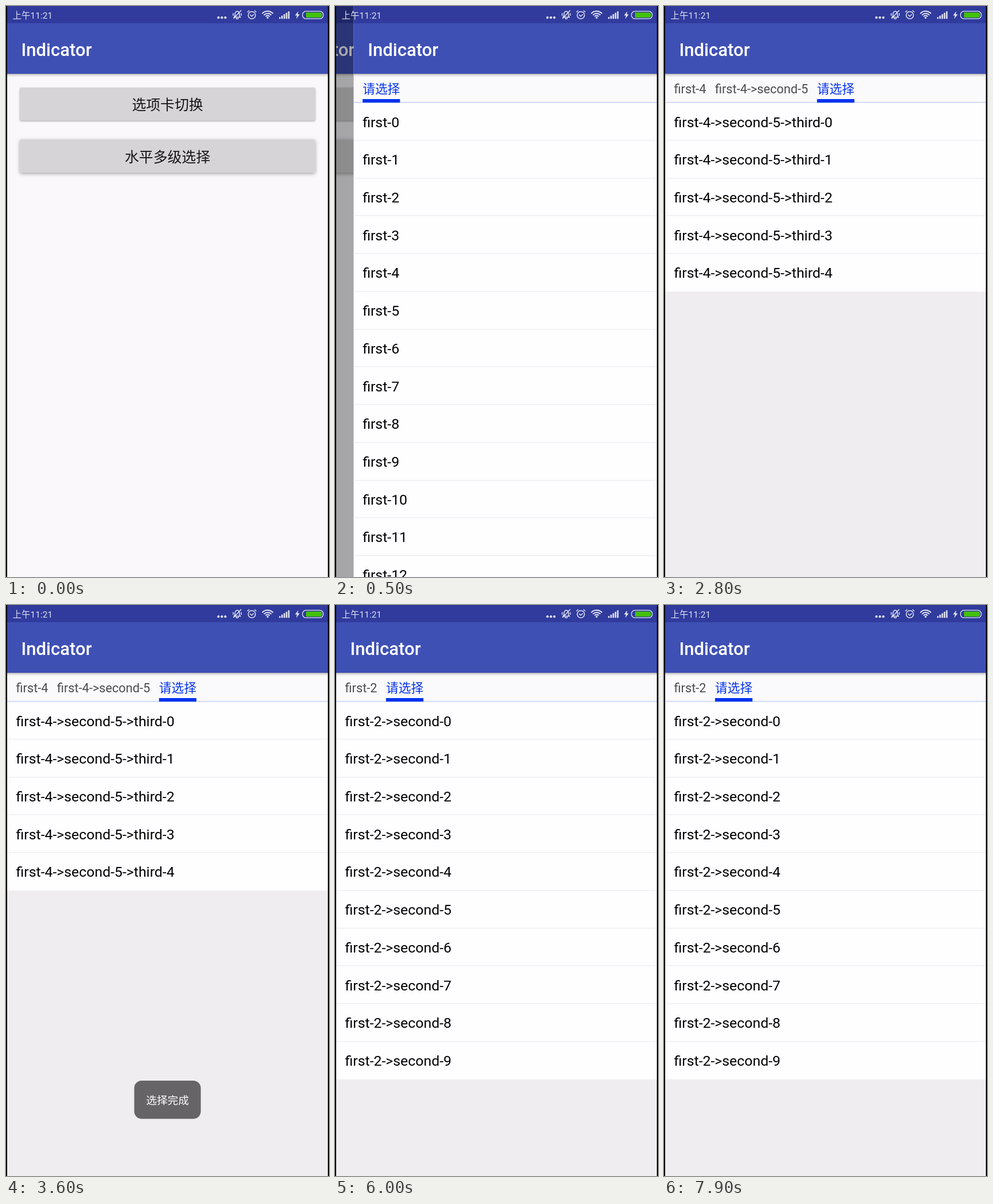
Animation of 563 by 994 pixels, one loop 8 s. Source, as an HTML page with a canvas:

```html
<!DOCTYPE html>
<html lang="zh-CN">
<head>
<meta charset="utf-8">
<title>Indicator</title>
<style>
html, body { margin: 0; width: 100%; height: 100%; overflow: hidden; background: #000; }
canvas { display: block; width: 563px; height: 994px; }
</style>
</head>
<body>
<canvas id="stage" width="563" height="994"></canvas>
<script>
const ctx = document.getElementById('stage').getContext('2d');
const LOOP = 8000, W = 563, H = 994;
const LEFT = 2, RIGHT = 561, WIDTH = RIGHT - LEFT;
const DP = WIDTH / 360;
const FONT = 'Roboto, "Noto Sans CJK SC", "Noto Sans CJK", sans-serif';
const BLUE = '#0433ee', ICON = '#e2e4f4';
const LIST_TOP = 168.3, ROW = 65.72;
const LEVELS = ['first', 'second', 'third'], COUNTS = [20, 10, 5];
const SLIDE_AT = 200, SLIDE_TIME = 393, MOVE_TIME = 350;
const TOAST_IN = 2900, TOAST_OUT = 5000;

// Selected index per level, from the given time on
const STEPS = [
  { at: 0, path: [] },
  { at: 1400, path: [4] },
  { at: 2100, path: [4, 5] },
  { at: 4000, path: [4] },
  { at: 4950, path: [] },
  { at: 5600, path: [2] },
  { at: 6400, path: [2, 3] },
  { at: 7500, path: [2] }
];

const clamp = v => Math.max(0, Math.min(1, v));
const mix = (a, b, k) => a + (b - a) * k;
const smooth = k => (1 - Math.cos(Math.PI * k)) / 2;
const font = (sp, weight = 400) => `${weight} ${sp * DP}px ${FONT}`;

function rect(x, y, w, h, fill) {
  ctx.fillStyle = fill;
  ctx.fillRect(x, y, w, h);
}

function pill(x, y, w, h, r) {
  ctx.beginPath();
  ctx.roundRect(x, y, w, h, r);
}

function text(str, x, y, sp, color, weight, align = 'left') {
  ctx.font = font(sp, weight);
  ctx.fillStyle = color;
  ctx.textAlign = align;
  ctx.fillText(str, x, y);
}

function line(points) {
  ctx.beginPath();
  points.forEach(([x, y], i) => i ? ctx.lineTo(x, y) : ctx.moveTo(x, y));
}

function arc(x, y, r, a = 0, b = 7) {
  ctx.beginPath();
  ctx.arc(x, y, r, a, b);
}

function appBar() {
  const shade = ctx.createLinearGradient(0, 118, 0, 124);
  shade.addColorStop(0, 'rgba(0,0,0,.3)');
  shade.addColorStop(0.4, 'rgba(0,0,0,.1)');
  shade.addColorStop(1, 'rgba(0,0,0,0)');
  rect(LEFT, 118, WIDTH, 6, shade);
  rect(LEFT, 0, WIDTH, 31, '#303b9d');
  rect(LEFT, 30, WIDTH, 88, '#3f50b5');
  text('Indicator', 26.5, 87, 20, '#fff', 500);
}

function button(label, y, h, blur, drop) {
  ctx.save();
  ctx.shadowColor = 'rgba(0,0,0,.34)';
  ctx.shadowBlur = blur;
  ctx.shadowOffsetY = drop;
  ctx.fillStyle = '#d6d4d6';
  pill(24, y, 515, h, 3);
  ctx.fill();
  ctx.restore();
  text(label, 281.5, y + 39, 16, '#161616', 400, 'center');
}

function menuScreen() {
  rect(LEFT, 0, WIDTH, H, '#faf8fb');
  appBar();
  button('选项卡切换', 142, 57.5, 3, 1);
  button('水平多级选择', 232.5, 57.5, 6, 2);
}

function prefix(path, n) {
  return path.slice(0, n).map((v, i) => `${LEVELS[i]}-${v}`).join('->');
}

function tabsOf(path) {
  const labels = path.map((_, i) => prefix(path, i + 1)).concat('请选择');
  let x = LEFT + 10 * DP;
  ctx.font = font(14);
  return labels.map(label => {
    const tab = { label, x, w: ctx.measureText(label).width };
    x += tab.w + 10 * DP;
    return tab;
  });
}

function marker(index, tabs, t) {
  const end = tabs[tabs.length - 1];
  if (!index) return end;
  const step = STEPS[index], last = STEPS[index - 1].path;
  const from = step.path.length > last.length
    ? tabs[last.length] : tabsOf(last)[last.length];
  const k = smooth(clamp((t - step.at) / MOVE_TIME));
  return { x: mix(from.x, end.x, k), w: mix(from.w, end.w, k) };
}

function listScreen(t) {
  const index = STEPS.findLastIndex(s => t >= s.at);
  const path = STEPS[index].path, depth = path.length;
  rect(LEFT, 0, WIDTH, H, '#efedf0');
  rect(LEFT, 118, WIDTH, 50, '#faf9fb');
  appBar();

  const tabs = tabsOf(path);
  tabs.forEach((tab, i) =>
    text(tab.label, tab.x, 152.2, 14, i === depth ? BLUE : '#4c4b4d'));

  const lead = depth ? prefix(path, depth) + '->' : '';
  for (let i = 0; i < COUNTS[depth]; i++) {
    const y = LIST_TOP + i * ROW;
    if (y > H) break;
    rect(LEFT, y, WIDTH, ROW + 0.3, '#fefdff');
    if (i) rect(LEFT, Math.round(y) - 1, WIDTH, 1.5, '#f0eff2');
    text(`${lead}${LEVELS[depth]}-${i}`, LEFT + 10 * DP, y + 42.2, 16, '#000');
  }
  rect(LEFT, 167.2, WIDTH, 1.2, '#b8cbf5');
  const m = marker(index, tabs, t);
  rect(m.x, 162, m.w, 6.2, BLUE);
}

function bell() {
  line([[397.5, 19.5], [399.2, 17], [399.2, 13], [401, 9.8], [403, 9], [405, 9.8],
    [406.8, 13], [406.8, 17], [408.5, 19.5]]);
  ctx.closePath();
  ctx.stroke();
  arc(403, 20.5, 2, 0, Math.PI);
  ctx.stroke();
  line([[396.5, 22], [410, 7.5]]);
  ctx.stroke();
  for (const s of [-1, 1]) {
    line([[403 + s * 7, 12.5], [403 + s * 7, 17]]);
    ctx.stroke();
  }
}

function clock() {
  arc(428.5, 16, 6.3);
  ctx.stroke();
  line([[425.3, 15], [428.3, 18], [432, 14.5]]);
  ctx.stroke();
  for (const s of [-1, 1]) {
    line([[428.5 + s * 4.5, 7.8], [428.5 + s * 7.8, 10.8]]);
    ctx.stroke();
  }
}

function wifi() {
  ctx.lineWidth = 2;
  for (const r of [12.5, 8.6, 4.8]) {
    arc(456, 21.5, r, -Math.PI * 0.77, -Math.PI * 0.23);
    ctx.stroke();
  }
  arc(456, 20.4, 1.7);
  ctx.fill();
}

function battery() {
  line([[509.5, 9], [503.8, 16.5], [507.2, 16.5], [505.8, 22.5], [512, 14.4], [508.4, 14.4]]);
  ctx.fill();
  ctx.lineWidth = 1.3;
  pill(516.8, 9.2, 36.2, 13, 6);
  ctx.stroke();
  ctx.fillStyle = '#42c00a';
  pill(523, 11.2, 28, 9, [1, 4, 4, 1]);
  ctx.fill();
}

function statusBar() {
  text('上午11:21', 11.5, 22, 10, '#dfe1f2');
  ctx.fillStyle = ctx.strokeStyle = ICON;
  ctx.lineWidth = 1.5;
  for (let i = 0; i < 3; i++) {
    arc(370.3 + i * 6, 20.2, 2.1);
    ctx.fill();
  }
  bell();
  clock();
  wifi();
  for (let i = 0; i < 5; i++) {
    const h = 3 + i * 2.5;
    ctx.fillRect(476 + i * 3.9, 22.3 - h, 2.6, h);
  }
  battery();
}

function toast(t) {
  const show = clamp((t - TOAST_IN) / 300), hide = clamp((t - TOAST_OUT) / 200);
  const alpha = show * (1 - hide);
  if (!alpha) return;
  ctx.save();
  ctx.globalAlpha = alpha;
  ctx.translate(0, 36 * (1 - show) ** 2);
  ctx.fillStyle = '#666467';
  pill(223.5, 828, 116, 66.5, 13);
  ctx.fill();
  text('选择完成', 281.5, 868.5, 12, '#fff', 400, 'center');
  ctx.restore();
}

function draw(t) {
  const p = 1 - (1 - clamp((t - SLIDE_AT) / SLIDE_TIME)) ** 2;
  rect(0, 0, W, H, '#000');
  ctx.save();
  ctx.beginPath();
  ctx.rect(LEFT, 0, WIDTH, H);
  ctx.clip();
  if (p < 1) {
    ctx.save();
    ctx.translate(-122 * p, 0);
    menuScreen();
    ctx.restore();
    rect(LEFT, 0, WIDTH, H, `rgba(0,0,0,${0.355 * p})`);
  }
  if (p > 0) {
    ctx.translate(WIDTH * (1 - p), 0);
    listScreen(t);
  }
  ctx.restore();
  statusBar();
  toast(t);
}

const start = performance.now();
function tick(now) {
  draw(Math.max(0, now - start) % LOOP);
  requestAnimationFrame(tick);
}
draw(0);
requestAnimationFrame(tick);
</script>
</body>
</html>
```
